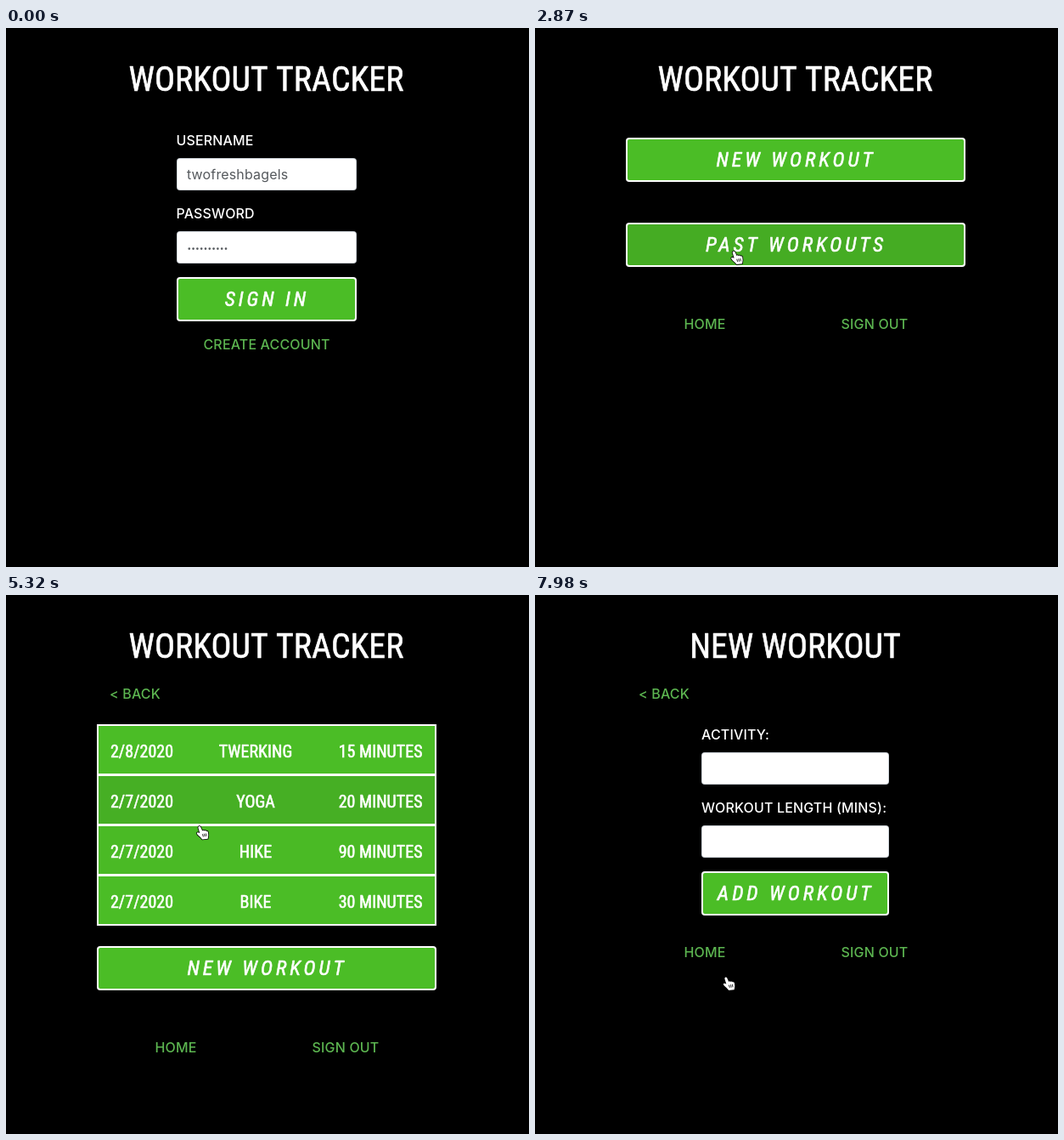
Recreate the animation shown at these times as an HTML page with a canvas. Size 616 by 634 pixels, loop 8 s.

```html
<!DOCTYPE html>
<html lang="en">
<head>
<meta charset="utf-8">
<title>Workout Tracker</title>
<style>
  html, body { margin: 0; width: 100%; height: 100%; overflow: hidden; background: #000; }
  canvas { display: block; width: 100vw; height: 100vh; }
</style>
</head>
<body>
<canvas id="stage"></canvas>
<script>
const W = 616, H = 634, LOOP = 8000, MID = 307;
const GREEN = [75, 189, 38], DARK = [69, 172, 35];
const LINK = '#5cb550', INK = '#55595d', FOCUS = '#2d4f8c';
const canvas = document.getElementById('stage');
const ctx = canvas.getContext('2d');

// Pages by start time
const pages = [
  { from: 0, draw: signIn, items: { sign: [201, 293, 212, 52] } },
  { from: 1820, draw: home, items: { create: [107, 129, 400, 52], past: [107, 229, 400, 52] } },
  { from: 3850, draw: list, items: {
    row0: [107, 152, 400, 59], row1: [107, 211, 400, 59.5],
    row2: [107, 270.5, 400, 58.5], row3: [107, 329, 400, 60],
    create: [107, 413, 400, 52] } },
  { from: 7665, draw: newWorkout, items: { add: [196, 325, 221, 52] } }
];

// Pointer path: time, x, y
const path = [
  [0, 335, 660], [250, 332, 655], [840, 318, 345], [1150, 314, 338], [2030, 314, 338],
  [2750, 236, 262], [3350, 220, 258], [3570, 217, 262], [3710, 214, 281.5],
  [3980, 91, 158], [4060, 101, 157], [4270, 125, 172], [4700, 205, 190],
  [5020, 222, 245], [5320, 228, 271], [5750, 232, 318], [6150, 228, 362],
  [6600, 225, 448.5], [8000, 225, 448.5]
];

const clicks = [
  { at: 1540, x: 314, y: 338, item: 'sign', until: 1820 },
  { at: 3430, x: 218, y: 260, item: 'past', until: 3850 },
  { at: 6860, x: 225, y: 448, item: 'create', until: 7665 }
];
const RING_TIME = 140;

// Stale hand shape while the pointer rests after a page change
const resting = [[1820, 2030], [7665, 8000]];

const arrowShape = new Path2D('M0 0V16L3.7 12.6 6.1 18.2 8.5 17.1 6.2 11.7 11.4 11.4Z');
const handShape = new Path2D('M-1.6 1.4Q.2-1.2 1.9 1.2L3.6 6.4Q5 5 6.2 6.8 7.6 5.6 8.8 7.4 10.6 6.8 11.2 8.8V12.4Q10.8 14.4 9.8 17.2H2.2Q0 14-2.6 11.6-5.2 8.4-3.6 7.7-2 7.5-.2 9Z');
const handLines = new Path2D('M3.2 10.4L4 14M5.6 10.2L6.2 14M8 10.2L8.4 13.8');

const pageAt = t => pages.filter(p => p.from <= t).pop();
const within = (t, a, b) => t >= a && t < b;

function pointer(t) {
  let i = 1;
  while (i < path.length - 1 && path[i][0] < t) i++;
  const [t0, x0, y0] = path[i - 1], [t1, x1, y1] = path[i];
  const u = Math.max(0, Math.min(1, (t - t0) / (t1 - t0)));
  const e = u * u * (3 - 2 * u);
  return [x0 + (x1 - x0) * e, y0 + (y1 - y0) * e];
}

function inside([px, py], [x, y, w, h]) {
  return px >= x && px < x + w && py >= y && py < y + h;
}

function isFocused(name, t) {
  return clicks.some(c => c.item === name && within(t, c.at + RING_TIME, c.until));
}

// Share of the last 150 ms spent over an item, used as its fade
function hover(name, t) {
  if (isFocused(name, t)) return 1;
  const page = pageAt(t), steps = 15;
  let hits = 0;
  for (let i = 0; i < steps; i++) {
    const s = t - i * 10;
    if (s >= page.from && inside(pointer(s), page.items[name])) hits++;
  }
  return hits / steps;
}

function shade(name, t) {
  const k = hover(name, t);
  return `rgb(${GREEN.map((v, i) => Math.round(v + (DARK[i] - v) * k))})`;
}

function condensedFont(size, style = '') {
  return `${style} condensed ${size}px "Roboto Condensed", Roboto, sans-serif`;
}

// Synthetic condensing when no condensed face is available
function findSqueeze() {
  const width = font => {
    ctx.font = font;
    return ctx.measureText('WORKOUT TRACKER').width;
  };
  return width(condensedFont(100)) > 0.95 * width('100px Roboto, sans-serif') ? 0.87 : 1;
}
const squeeze = findSqueeze();

// The thin outline thickens the strokes without widening the text
function condensed(text, x, y, size, align = 'center', style = '', spacing = 0) {
  ctx.save();
  ctx.translate(x, y);
  ctx.scale(squeeze, 1);
  ctx.font = condensedFont(size, style);
  ctx.letterSpacing = spacing / squeeze + 'px';
  ctx.textAlign = align;
  ctx.fillStyle = ctx.strokeStyle = '#fff';
  ctx.lineWidth = 0.6;
  ctx.lineJoin = 'round';
  ctx.fillText(text, 0, 0);
  ctx.strokeText(text, 0, 0);
  ctx.restore();
}

function label(text, x, y, color = '#fff', align = 'left', weight = 500) {
  ctx.font = `${weight} 16px Inter, sans-serif`;
  ctx.letterSpacing = '0.15px';
  ctx.textAlign = align;
  ctx.fillStyle = color;
  ctx.fillText(text, x, y);
}

function box(x, y, w, h, r, fill) {
  ctx.beginPath();
  ctx.roundRect(x, y, w, h, r);
  ctx.fillStyle = fill;
  ctx.fill();
}

function button(name, text, t) {
  const [x, y, w, h] = pageAt(t).items[name];
  if (isFocused(name, t)) box(x - 3, y - 3, w + 6, h + 6, 6, FOCUS);
  box(x, y, w, h, 4, '#fff');
  box(x + 2, y + 2, w - 4, h - 4, 2, shade(name, t));
  condensed(text, x + w / 2 + 0.5, y + 34, 24, 'center', 'italic', 3.95);
}

function field(x, y, w) {
  box(x, y, w, 38, 4, '#ced4da');
  box(x + 1, y + 1, w - 2, 36, 3, '#fff');
}

function title(text) {
  condensed(text, MID - 0.5, 74, 40);
}

function footer(y) {
  label('HOME', 200, y, LINK, 'center');
  label('SIGN OUT', 400, y, LINK, 'center');
}

function signIn(t) {
  title('WORKOUT TRACKER');
  label('USERNAME', 200.5, 138);
  field(201, 153, 212);
  label('twofreshbagels', 213, 178, INK, 'left', 400);
  label('PASSWORD', 200.5, 224);
  field(201, 239, 212);
  for (let i = 0; i < 10; i++) box(214.5 + i * 4.8, 258.3, 2.6, 2.6, 1.3, INK);
  button('sign', 'SIGN IN', t);
  label('CREATE ACCOUNT', MID, 378, LINK, 'center');
}

function home(t) {
  title('WORKOUT TRACKER');
  button('create', 'NEW WORKOUT', t);
  button('past', 'PAST WORKOUTS', t);
  footer(354);
}

function list(t) {
  const rows = [
    ['2/8/2020', 'TWERKING', 15], ['2/7/2020', 'YOGA', 20],
    ['2/7/2020', 'HIKE', 90], ['2/7/2020', 'BIKE', 30]
  ];
  title('WORKOUT TRACKER');
  label('< BACK', 122, 122, LINK);
  box(107, 152, 400, 237, 0, '#fff');
  rows.forEach(([date, activity, minutes], i) => {
    const y = 154 + i * 59;
    box(109, y, 396, 56, 0, shade('row' + i, t));
    condensed(date, 123, y + 37, 20, 'left');
    condensed(activity, 294, y + 37, 20);
    condensed(minutes + ' MINUTES', 490.5, y + 37, 20, 'right');
  });
  button('create', 'NEW WORKOUT', t);
  footer(538);
}

function newWorkout(t) {
  title('NEW WORKOUT');
  label('< BACK', 122, 122, LINK);
  label('ACTIVITY:', 196, 170);
  field(196, 185, 221);
  label('WORKOUT LENGTH (MINS):', 196, 256);
  field(196, 271, 221);
  button('add', 'ADD WORKOUT', t);
  footer(426);
}

function circle(x, y, r, width, color) {
  ctx.beginPath();
  ctx.arc(x, y, r, 0, Math.PI * 2);
  ctx.lineWidth = width;
  ctx.strokeStyle = color;
  ctx.stroke();
}

function drawPointer(t) {
  const pos = pointer(t);
  const overItem = Object.values(pageAt(t).items).some(r => inside(pos, r));
  const hand = overItem || resting.some(([a, b]) => within(t, a, b));
  ctx.save();
  ctx.translate(...pos);
  ctx.lineJoin = 'round';
  if (hand) {
    ctx.translate(-0.5, 1);
    ctx.rotate(-0.12);
    ctx.scale(0.85, 0.92);
    ctx.lineWidth = 1.8;
    ctx.strokeStyle = '#000';
    ctx.stroke(handShape);
    ctx.fillStyle = '#fff';
    ctx.fill(handShape);
    ctx.lineWidth = 0.9;
    ctx.stroke(handLines);
  } else {
    ctx.lineWidth = 2.2;
    ctx.strokeStyle = '#fff';
    ctx.stroke(arrowShape);
    ctx.fillStyle = '#000';
    ctx.fill(arrowShape);
  }
  ctx.restore();
}

function frame(now) {
  const t = now % LOOP;
  const ratio = window.devicePixelRatio || 1;
  const w = Math.round(innerWidth * ratio), h = Math.round(innerHeight * ratio);
  if (canvas.width !== w || canvas.height !== h) {
    canvas.width = w;
    canvas.height = h;
  }
  ctx.setTransform(w / W, 0, 0, h / H, 0, 0);
  ctx.fillStyle = '#000';
  ctx.fillRect(0, 0, W, H);
  pageAt(t).draw(t);
  for (const c of clicks) {
    if (!within(t, c.at, c.at + RING_TIME)) continue;
    circle(c.x, c.y, 30.6, 3, '#000');
    circle(c.x, c.y, 30.8, 1.1, '#fff');
  }
  drawPointer(t);
  requestAnimationFrame(frame);
}
requestAnimationFrame(frame);
</script>
</body>
</html>
```
